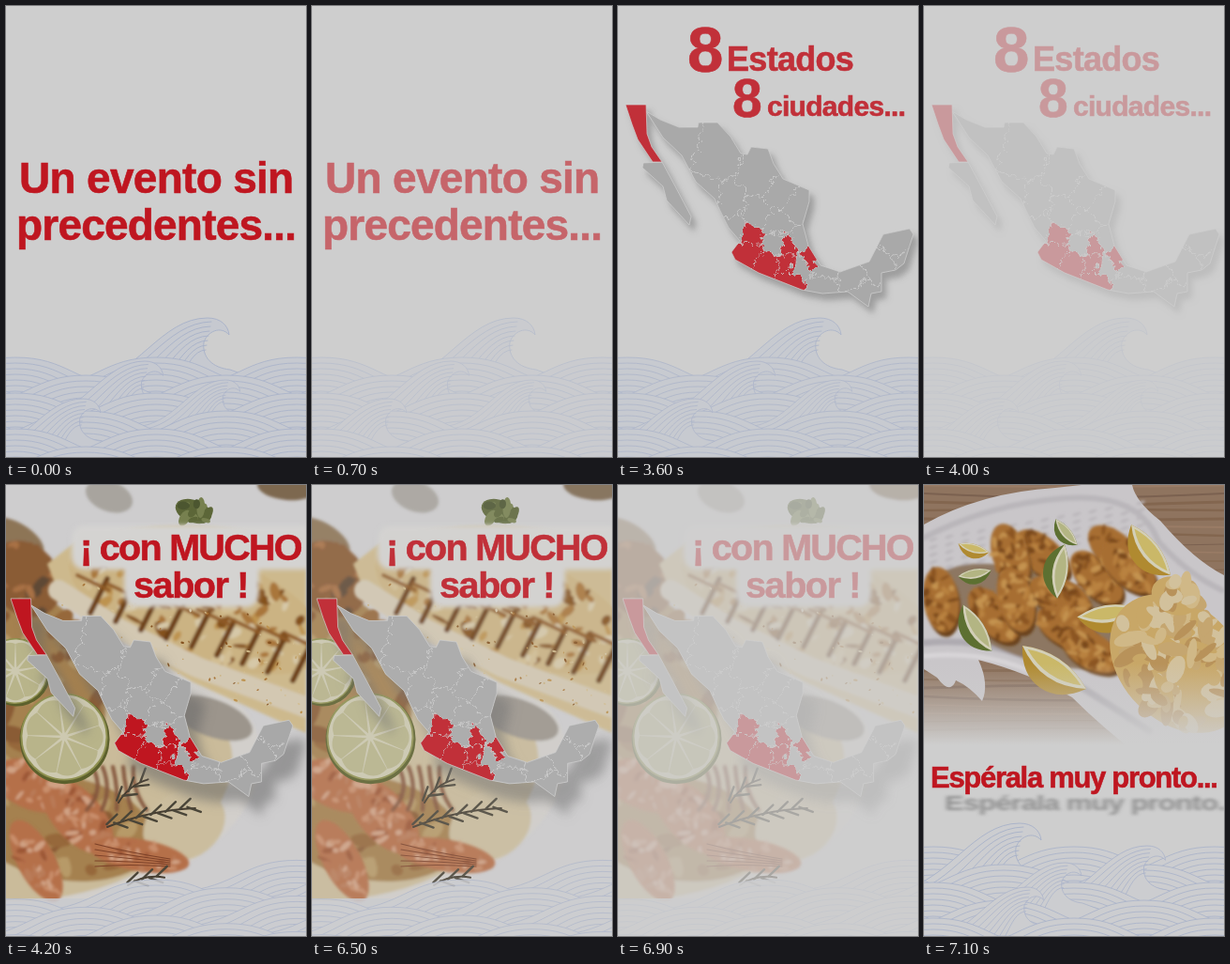
Write an HTML page that moves like this. It is 320 by 480 pixels and loops after 8 s.

```html
<!DOCTYPE html>
<html lang="es">
<head>
<meta charset="utf-8">
<style>
html, body { margin: 0; width: 100%; height: 100%; overflow: hidden; background: #cecece; }
svg { display: block; width: 100%; height: 100%; }
text { font-family: "Liberation Sans", Arial, sans-serif; font-weight: bold; fill: #bf1620; stroke: #bf1620; stroke-width: .6; }
.shadow { fill: #666; stroke: none; }
</style>
</head>
<body>
<svg id="stage" viewBox="0 0 320 480"></svg>
<script>
const GREY = '#cecece', RED = '#bf1620', INK = '#a7b1c9', PALE = '#d2d2d2';
let seed = 7;
const rnd = (a, b) => a + (b - a) * ((seed = seed * 16807 % 2147483647) / 2147483647);
const pick = list => list[Math.floor(rnd(0, list.length))];
const repeat = (n, f) => Array.from({ length: n }, (_, i) => f(i)).join('');

const group = (more, ...parts) => `<g ${more}>${parts.join('')}</g>`;
const place = (x, y, turn, ...parts) => group(`transform="translate(${x} ${y}) rotate(${turn})"`, ...parts);
const soft = (...parts) => group('filter="url(#soft)"', ...parts);
const path = (d, fill, more = '') => `<path d="${d}" fill="${fill}" ${more}/>`;
const line = (d, color, w) => path(d, 'none', `stroke="${color}" stroke-width="${w}" stroke-linecap="round" stroke-linejoin="round"`);
const blob = (x, y, rx, ry, turn, fill) =>
  `<ellipse rx="${rx}" ry="${ry}" fill="${fill}" transform="translate(${x} ${y}) rotate(${turn})"/>`;
const rect = (x, y, w, h, fill, more = '') =>
  `<rect x="${x}" y="${y}" width="${w}" height="${h}" fill="${fill}" ${more}/>`;
const text = (x, y, size, gap, s, more = '') =>
  `<text x="${x}" y="${y}" font-size="${size}" letter-spacing="${gap}" ${more}>${s}</text>`;

// Sea: rows of striped swells with curling crests among them
function swell(x, y) {
  const w = 125, h = 34;
  const dome = k => {
    const a = w - k * 5, top = y + k * 6, foot = y + h + k * 7;
    return `M${x - a},${foot} C${x - a * .5},${foot - 6} ${x - a * .45},${top} ${x},${top} S${x + a * .5},${foot - 6} ${x + a},${foot}`;
  };
  return path(dome(0) + `V520H${x - w}Z`, 'inherit') + repeat(8, k => line(dome(k), INK, .8));
}
function crest(x, y, s) {
  const back = 'M-130,72 C-75,62 -50,0 0,0 C14,0 22,8 23,18', hollow = 'C14,8 0,14 -4,26 C-6,42 5,53 24,55 L70,72';
  return group(`transform="translate(${x} ${y}) scale(${s})"`,
    path(back + hollow + 'V200H-130Z', 'inherit'), line(back + hollow, INK, .9),
    repeat(7, k => line(`M${-122 + 9 * k},${76 + 5 * k} C${-70 + 7 * k},${66 + 5 * k} ${-46 + 3 * k},${5 + 5 * k} ${4 - k},${4 + 5 * k}`, INK, .9)));
}
function sea(fill, top, tilt, crests) {
  const parts = crests.map(([x, y, s]) => ({ depth: y + 38 * s, art: crest(x, y, s) }));
  for (let row = 0; row < 6; row++)
    for (let x = row % 2 ? -65 : 10; x < 400; x += 150) {
      const y = top + row * 19 + tilt * (1 - x / 320);
      parts.push({ depth: y, art: swell(x, y) });
    }
  parts.sort((a, b) => a.depth - b.depth);
  return group(`fill="${fill}"`, ...parts.map(p => p.art));
}
const mainSea = () => sea('#c6c9d0', 374, 0, [[215, 332, 1], [148, 378, .85], [234, 398, .68], [82, 418, .82]]);

// Country map: states are the cells nearest to each centre, cut by the coast
const COAST = 'M30,112 45,121 65,129 85,129 86,124 106,124 120,139 131,157 138,158 142,150 160,152 166,168 176,184 204,196 204,208 197,232 203,255 216,276 237,283 268,272 283,243 311,237 315,243 305,274 296,281 281,284 281,304 270,306 267,320 245,304 218,306 196,302 150,284 125,270 121,262 130,250 118,236 109,218 103,205 83,187 68,159 48,140Z';
const PLAIN = [[60, 145], [103, 155], [148, 180], [168, 195], [188, 212], [88, 202], [118, 208], [143, 220], [168, 230],
  [120, 236], [165, 249], [189, 247], [190, 272], [216, 276], [216, 294], [246, 286], [258, 304], [276, 275], [296, 247], [306, 270]];
const MARKED = [[136, 258], [137, 241], [178, 252], [156, 271], [178, 291], [178, 270], [201, 267]];
const CENTRES = [...PLAIN, ...MARKED];

function cell([x, y]) {
  let shape = [[0, 90], [330, 90], [330, 340], [0, 340]];
  for (const [u, v] of CENTRES) {
    if (u === x && v === y) continue;
    const side = p => (p[0] - (x + u) / 2) * (u - x) + (p[1] - (y + v) / 2) * (v - y);
    shape = shape.flatMap((p, i) => {
      const q = shape[(i + 1) % shape.length], a = side(p), b = side(q), f = a / (a - b);
      const out = a <= 0 ? [p] : [];
      if (a * b < 0) out.push([p[0] + f * (q[0] - p[0]), p[1] + f * (q[1] - p[1])]);
      return out;
    });
  }
  return 'M' + shape.join(' ') + 'Z';
}
const edged = (d, fill) => path(d, fill, `stroke="${PALE}" stroke-width=".7"`);
const map = (fill, dx, dy, blur) => group(`style="filter:drop-shadow(${dx}px ${dy}px ${blur}px #6668)"`,
  group('clip-path="url(#coast)"', rect(0, 90, 320, 240, fill),
    group('filter="url(#rough)"', ...PLAIN.map(c => edged(cell(c), fill)), ...MARKED.map(c => edged(cell(c), RED)))),
  edged(COAST, 'none'),
  edged('M27,167 47,166 60,190 78,224 76,233 52,207 48,192 26,172Z', fill),
  edged('M8,105 30,105 31,136 36,150 47,166 37,166 21,142 15,126Z', RED));

// Food: ellipses filled with random flecks of their own tones
const patch = (x, y, a, b, turn, tones, n, size = 4) => place(x, y, turn, blob(0, 0, a, b, 0, tones[0]),
  repeat(n, () => {
    const r = Math.sqrt(rnd(0, .8)), q = rnd(0, 2 * Math.PI);
    return blob(a * r * Math.cos(q), b * r * Math.sin(q), size * rnd(.5, 1.6), size * rnd(.3, .8), rnd(0, 180), pick(tones));
  }));
const lime = (x, y, r, turn) => place(x, y, turn,
  blob(1, 2, r, r, 0, '#5c602c'), blob(0, 0, r * .97, r * .97, 0, '#8f9150'), blob(0, 0, r * .93, r * .93, 0, '#cdc9b0'),
  repeat(9, i => path(`M0,-4 L${r * .27},${-r * .76} Q0,${-r * .98} ${-r * .27},${-r * .76}Z`, '#b8b48a', `transform="rotate(${i * 40})"`)));
const wedge = (rind, flesh) => (x, y, r, turn) => place(x, y, turn,
  path(`M${-r},0 Q0,${-r * .5} ${r},0 Q${r * .6},${r * .65} 0,${r * .65} T${-r},0Z`, rind),
  path(`M${-r},0 Q0,${-r * .5} ${r},0 Q0,${r * .62} ${-r},0Z`, '#d3cfb8'),
  path(`M${-r * .84},0 Q0,${-r * .36} ${r * .84},0 Q0,${r * .42} ${-r * .84},0Z`, flesh));
const limeWedge = wedge('#5d7031', '#b3b583'), lemonWedge = wedge('#b08a30', '#cab868');
const sprig = (x, y, turn, n) => place(x, y, turn, line(`M0,0 Q${n * 4},-8 ${n * 8},0`, '#453c30', 2),
  repeat(n, i => line(`M${i * 8},-3 l13,${i % 2 ? 8 : -8}`, '#4a4538', 2.4)));

const CRUST = ['#cbb383', '#d6c8a8', '#a9763a', '#bd9350', '#84511f', '#d2bd92'];
const SHRIMP = ['#b56f4a', '#c98f6c', '#9c5636', '#d0a284', '#b97c58'];
const BROTH = ['#a5814f', '#96683a', '#b79a68', '#8a5b34'];
const FRIED = ['#a76e31', '#8b5522', '#b9823f', '#c49350', '#7a481c'];
const CHIPS = ['#c8a767', '#d0b887', '#b8925a', '#d2c19c', '#c5a670'];

const grill = () => group('',
  rect(0, 0, 320, 480, '#cecdce'),
  soft(
    blob(110, 12, 26, 16, 20, '#a8a49e'), blob(300, 2, 32, 14, 5, '#7d6850'), blob(10, 56, 34, 16, 30, '#8d7457'),
    blob(60, 318, 215, 130, -12, '#d2cfcb'), blob(55, 322, 190, 115, -14, '#cabb9a'),
    patch(30, 225, 75, 110, -10, BROTH, 40, 12), patch(60, 365, 100, 55, 10, BROTH, 30, 10), blob(190, 362, 46, 36, -30, '#cbbd9e'),
    blob(220, 248, 45, 20, 20, '#9c958c'), patch(20, 100, 44, 36, 50, ['#8a5b35', '#a87145', '#5f4a36'], 25, 8)),
  patch(200, 28, 20, 12, 20, ['#5c6638', '#77804f', '#4c5630'], 12, 7),
  soft(path('M44,84 L80,56 Q200,28 320,62 V264 L200,210 L120,162 L58,120Z', '#cdb98d'),
    patch(205, 128, 145, 58, 20, CRUST, 130, 7),
    line('M56,112 L122,154 L204,194 L330,240', '#d3c8b2', 22),
    repeat(9, i => line(`M${90 + i * 27},${136 + i * 9} l18,-36`, '#6d4019', 6)),
    repeat(8, i => line(`M${76 + i * 32},${96 + i * 9} l34,16`, '#8f5a26', 4))),
  repeat(90, () => {
    const x = rnd(60, 318);
    return blob(x, rnd(60, 165) + x * .27, rnd(.6, 2.4), rnd(.5, 1.3), rnd(0, 180), pick(CRUST));
  }),
  lime(10, 198, 36, -20),
  soft(patch(30, 320, 46, 26, 20, SHRIMP, 35, 5), patch(76, 352, 50, 26, 48, SHRIMP, 45, 5),
    patch(142, 394, 54, 17, 10, SHRIMP, 40, 4), patch(32, 400, 48, 20, 62, SHRIMP, 30, 5),
    repeat(5, i => line(`M${92 + i * 11},300 q${14 - i * 4},24 ${-6 + i * 5},46`, '#84563c', 4))),
  repeat(5, i => line(`M95,${382 + i * 6} q35,${9 - i * 3} 80,${16 - i * 4}`, '#7d4229', 1.2)),
  sprig(108, 364, -12, 12), sprig(120, 338, -38, 5), sprig(130, 426, -12, 5),
  lime(62, 268, 48, 12),
  group('filter="url(#halo)"', rect(70, 43, 260, 47, '#d4d3d1', 'rx="14"'), rect(126, 76, 144, 54, '#d4d3d1', 'rx="14"')));

const fried = () => group('',
  rect(0, 0, 320, 290, '#8f745f'),
  repeat(32, i => line(`M0,${i * 9} q160,${rnd(-6, 9)} 320,0`, pick(['#83664f', '#9a7c66', '#7b6150']), rnd(1, 3))),
  path('M0,42 Q60,8 140,3 L168,0 H222 Q226,18 252,38 Q288,80 320,96 V290 H232 Q190,258 158,226 Q112,200 58,186 Q70,212 62,230 Q48,214 34,208 Q28,224 14,205 L0,196Z', '#c9c6c9'),
  soft(line('M0,56 Q70,20 150,14 T250,60 Q280,94 318,112', '#b9b6ba', 6),
    line('M0,168 Q80,160 150,204 T240,262', '#aeaab0', 7), line('M0,182 Q80,174 144,214', '#d8d5d8', 5),
    repeat(70, i => blob(10 + i % 14 * 17, 58 - i % 14 * 3 + Math.floor(i / 14) * 8, 5, 1.5, -20, '#bab6ba')),
    blob(120, 140, 115, 46, 18, '#8d7762')),
  [[18, 122, 82], [74, 138, 48], [126, 74, 40], [184, 98, 45], [204, 70, 42], [218, 88, 40], [144, 118, 22],
    [92, 75, 72], [98, 122, 75], [152, 152, 28], [178, 176, 30]].map(([x, y, turn]) =>
    soft(blob(x + 2, y + 4, 36, 19, turn, '#6b431f'), patch(x, y, 35, 19, turn, FRIED, 34, 5))).join(''),
  lemonWedge(53, 67, 17, 15), limeWedge(54, 94, 18, -10), limeWedge(152, 50, 18, 50), limeWedge(146, 92, 29, 98),
  limeWedge(57, 152, 29, 58), lemonWedge(242, 69, 34, 52), lemonWedge(196, 136, 33, -8), lemonWedge(139, 194, 41, 34),
  patch(272, 190, 84, 62, 45, CHIPS, 120, 12), patch(268, 118, 26, 20, 20, CHIPS, 14, 12),
  rect(0, 190, 320, 102, 'url(#fade)'));

const SHOTS = [
  { from: 0, fade: 500, art: () => mainSea() +
    text(14, 199, 46, -.7, 'Un evento sin') + text(11, 249, 46, -.8, 'precedentes...') },
  { from: 1100, fade: 3600, art: () => mainSea() + map('#a3a3a3', 5, 7, 3) +
    text(74, 70, 69, 0, '8') + text(116, 69, 36, -.7, 'Estados') +
    text(122, 118, 57, 0, '8') + text(159, 117, 30, -.7, 'ciudades...') },
  { from: 4200, fade: 6500, art: () => grill() +
    group('opacity=".85"', rect(0, 440, 320, 40, '#c9cacf'), sea('#cbccd0', 398, 44, [])) +
    group('transform="translate(-2.8 18) scale(.98)"', map('#a8a8a8', 14, 20, 6)) +
    text(79, 80, 39.5, -1.7, '¡ con MUCHO') + text(136, 120, 39.5, -1.4, 'sabor !') },
  { from: 7100, fade: 9000, art: () => fried() + rect(0, 290, 320, 190, GREY) +
    sea('#cccdd0', 385, 0, [[102, 360, 1], [238, 384, .85], [150, 402, .78], [110, 428, .76]]) +
    group('filter="url(#halo)" opacity=".6" transform="translate(22 346) scale(1 .7)"',
      text(0, 0, 31, -.9, 'Espérala muy pronto...', 'class="shadow"')) +
    text(7, 322, 31, -1.3, 'Espérala muy pronto...') }];

const stage = document.getElementById('stage');
stage.innerHTML = `<defs>
  <filter id="soft"><feGaussianBlur stdDeviation="1.4"/></filter>
  <filter id="halo"><feGaussianBlur stdDeviation="2.5"/></filter>
  <filter id="rough" color-interpolation-filters="sRGB"><feTurbulence baseFrequency=".09" numOctaves="2" result="n"/>
    <feDisplacementMap in="SourceGraphic" in2="n" scale="13" xChannelSelector="R" yChannelSelector="G"/></filter>
  <clipPath id="coast">${path(COAST, 'red')}</clipPath>
  <linearGradient id="fade" x2="0" y2="1"><stop stop-color="${GREY}" stop-opacity="0"/><stop offset=".85" stop-color="${GREY}"/></linearGradient>
  </defs>` + rect(0, 0, 320, 480, GREY) +
  SHOTS.map(s => group('class="shot"', s.art())).join('') + rect(0, 0, 320, 480, GREY, 'id="veil"');

const shots = stage.querySelectorAll('.shot'), veil = document.getElementById('veil');
function draw() {
  const t = performance.now() % 8000;
  const now = SHOTS.findLastIndex(s => t >= s.from);
  shots.forEach((g, i) => g.style.display = i === now ? '' : 'none');
  // Each shot fades to grey in 100 ms steps; the next one cuts in on the seventh
  const step = Math.floor((t - SHOTS[now].fade) / 100) + 1;
  veil.style.opacity = Math.max(0, step) / 7;
  requestAnimationFrame(draw);
}
draw();
</script>
</body>
</html>
```
